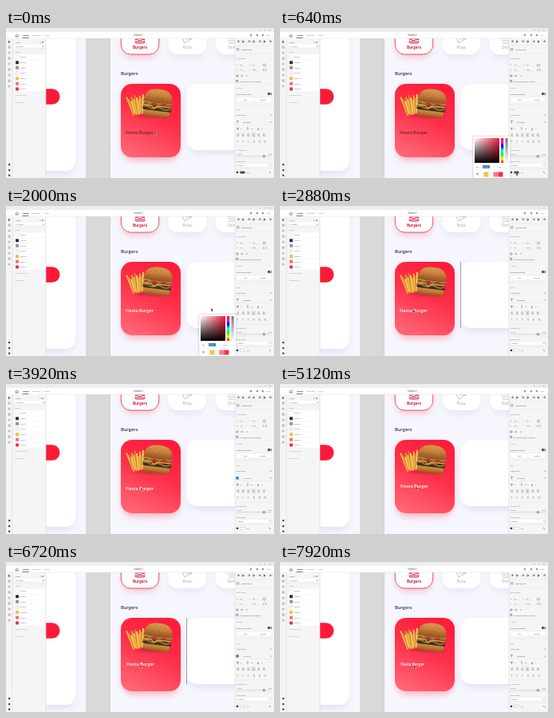
Recreate the animation shown at these times as an HTML page. Size 336 px wide and 188 px high, loop 8 s.

```html
<!DOCTYPE html>
<html lang="en">
<head>
<meta charset="utf-8">
<style>
html, body { margin: 0; width: 100%; height: 100%; overflow: hidden; background: #fff; }
svg { display: block; width: 100vw; height: 100vh; }
text { font-family: "Open Sans", "Noto Sans", sans-serif; white-space: pre; }
</style>
</head>
<body>
<svg id="stage" viewBox="0 0 336 188" xmlns="http://www.w3.org/2000/svg">
  <defs>
    <linearGradient id="red" x1=".7" y1="0" x2=".3" y2="1">
      <stop offset="0" stop-color="#fd1c3a"/><stop offset=".45" stop-color="#fe2f49"/><stop offset="1" stop-color="#ff6474"/>
    </linearGradient>
    <linearGradient id="bun" x1="0" y1="0" x2="0" y2="1">
      <stop offset="0" stop-color="#d99a52"/><stop offset=".5" stop-color="#c27a35"/><stop offset="1" stop-color="#95501f"/>
    </linearGradient>
    <linearGradient id="tint"><stop offset="0" stop-color="#fff"/><stop offset="1" stop-color="#f5203c"/></linearGradient>
    <linearGradient id="shade" x1="0" y1="0" x2="0" y2="1">
      <stop offset="0" stop-color="#000" stop-opacity="0"/><stop offset="1" stop-color="#000"/>
    </linearGradient>
    <linearGradient id="hue" x1="0" y1="0" x2="0" y2="1">
      <stop offset="0" stop-color="#f00"/><stop offset=".17" stop-color="#f0f"/><stop offset=".33" stop-color="#00f"/>
      <stop offset=".5" stop-color="#0ff"/><stop offset=".67" stop-color="#0f0"/><stop offset=".83" stop-color="#ff0"/>
      <stop offset="1" stop-color="#f00"/>
    </linearGradient>
    <linearGradient id="alpha" x1="0" y1="0" x2="0" y2="1">
      <stop offset="0" stop-color="#777"/><stop offset="1" stop-color="#fff"/>
    </linearGradient>
    <filter id="soft" x="-40%" y="-40%" width="180%" height="180%"><feGaussianBlur stdDeviation="4"/></filter>
    <filter id="tight" x="-40%" y="-40%" width="180%" height="180%"><feGaussianBlur stdDeviation="1.5"/></filter>
    <clipPath id="canvas"><rect x="50" y="13" width="237" height="175"/></clipPath>
  </defs>
</svg>
<script>
const NS = "http://www.w3.org/2000/svg";
const PANEL = "#f5f5f5", INK = "#3c3c3c", BLUE = "#2384bb";
const stage = document.getElementById("stage");

function add(parent, tag, attrs) {
  const el = document.createElementNS(NS, tag);
  for (const k in attrs) el.setAttribute(k, attrs[k]);
  parent.appendChild(el);
  return el;
}
const group = (parent, attrs = {}) => add(parent, "g", attrs);
const rect = (p, x, y, width, height, fill, more = {}) => add(p, "rect", { x, y, width, height, fill, ...more });
const path = (p, d, stroke, width = .5, more = {}) =>
  add(p, "path", { d, stroke, "stroke-width": width, fill: "none", ...more });
function label(p, x, y, str, size = 2.2, fill = "#666", more = {}) {
  const el = add(p, "text", { x, y, "font-size": size, fill, ...more });
  el.textContent = str;
  return el;
}
function card(p, x, y, w, h, r, fill, glow, opacity) {
  rect(p, x + 2, y + 4, w - 4, h, glow, { rx: r, opacity, filter: "url(#soft)" });
  rect(p, x, y, w, h, fill, { rx: r });
}
const bold = { "font-weight": 700 };
const semi = { "font-weight": 600 };
const mid = { "text-anchor": "middle" };

// Canvas
const canvas = group(stage, { "clip-path": "url(#canvas)" });
rect(canvas, 50, 13, 237, 175, "#d9d9d9");
rect(canvas, 50, 13, 50, 175, "#f6f6fe");
card(canvas, 20, -10, 67, 189, 12, "#fff", "#b9b9dc", .35);
rect(canvas, 30, 76.2, 37.5, 19.6, "#fc1a38", { rx: 9.8 });
rect(canvas, 131, 13, 156, 175, "#f6f6fe");
path(canvas, "M130.5 13V188", "#c4c4cb", .5);

card(canvas, 144, -10, 48, 43, 12, "#fff", "#f0425c", .28);
rect(canvas, 144.3, -10, 47.4, 43, "none", { rx: 12, stroke: "#d92a46", "stroke-width": .8 });
card(canvas, 203.5, -10, 47.5, 43, 12, "#fff", "#b9b9dc", .28);
card(canvas, 263, -10, 47.5, 43, 12, "#fff", "#b9b9dc", .28);

const burgerIcon = group(canvas, { transform: "translate(168 14)" });
path(burgerIcon, "M-6 -1Q-6 -5 0 -5T6 -1ZM-6.5 1Q-4.5 -.5 -2.5 1T1.5 1T6.5 1M-6 3H6Q6 5 4 5H-4Q-6 5 -6 3", "#d3203e", 1);
path(canvas, "M220 10Q228 7 235 12L224 19ZM222 12L233 14M225 14h2M229 13h1", "#999", .6);
path(canvas, "M276 10h11M277 13h10M278 16h9M279 19h8", "#999", .6);
label(canvas, 168, 26.2, "Burgers", 4.7, "#cf1f3d", { ...bold, ...mid });
label(canvas, 227, 26.2, "Pizza", 4.7, "#a0a0a6", mid);
label(canvas, 278, 26.2, "Drinks", 4.7, "#a0a0a6");
label(canvas, 144, 58.6, "Burgers", 5.7, "#30303a", semi);

card(canvas, 144, 70, 75, 92, 14, "url(#red)", "#ff5068", .4);
card(canvas, 226.5, 70, 80, 83, 13, "#fff", "#b9b9dc", .35);
const edge = path(canvas, "M226.5 70V153.5", "#777780", .7);

// Food picture, reduced to flat shapes
const food = group(canvas);
add(food, "ellipse", { cx: 184, cy: 110, rx: 23, ry: 2.5, fill: "#8c1024", opacity: .35, filter: "url(#tight)" });
for (let i = 0; i < 16; i++) {
  const x = 160 + i, top = 83 + (i * 7 % 5) * 1.6;
  rect(food, x, top, 1.9, 108 - top - (i % 3), ["#f3bd4a", "#cf8a26", "#fbd06c", "#e5a437"][i % 4],
    { rx: .4, transform: `rotate(${-22 + i * 2.4} ${x + 5} 110)` });
}
const burger = group(food, { transform: "rotate(7 190 95)" });
rect(burger, 173, 102, 33.5, 10, "url(#bun)", { rx: 4.5 });
rect(burger, 172, 98, 36, 6, "#4c2b1b", { rx: 2.5 });
path(burger, "M172 100.5Q176 98 180 100.5T188 100.5T196 100.5T207 100", "#78933c", 1.6);
path(burger, "M174 98.5L182 98L186 101L191 98H207", "#e2a436", 1.5);
path(burger, "M173 95.8H207", "#b5352a", 2.6);
path(burger, "M172 93.5Q174 91.5 177 94T183 94T189 94T195 94T201 94T208 93", "#80943e", 2.2);
add(burger, "path", { d: "M172.5 92.5Q171 77 190 76.5T207.5 92.5Q190 95 172.5 92.5Z", fill: "url(#bun)" });
for (let i = 0; i < 14; i++)
  add(burger, "ellipse", { cx: 179 + i * 1.7, cy: 80.5 + (i * 5 % 7) * .9, rx: .55, ry: .35, fill: "#f0cf96" });

const title = label(canvas, 150, 132.8, "Fiesta Burger", 5.5, "#fff", semi);

// Window bar
rect(stage, 0, 0, 336, 13, "#fff");
rect(stage, 0, 0, 336, 5, "#eee");
path(stage, "M0 13H336", "#dcdcdc", .5);
path(stage, "M12.2 9.2L13.7 7.8L15.2 9.2V11H12.2Z", INK, .6);
label(stage, 21, 10, "Design", 2.4, "#222", bold);
path(stage, "M20.5 12.3H28.5", "#333", .7);
label(stage, 33, 10, "Prototype", 2.3);
label(stage, 48, 10, "Share", 2.3);
label(stage, 166, 10, "Untitled-1", 2.6, INK, mid);
for (const x of [307, 315, 322])
  add(stage, "circle", { cx: x, cy: 9, r: .9, fill: "none", stroke: INK, "stroke-width": .6 });
label(stage, 326, 10, "100%", 2.4);
path(stage, "M318 2.5h2M324 2.5h2M330 1.5l2 2m0-2l-2 2", "#777", .4);

// Tools and assets
rect(stage, 0, 13, 50, 175, PANEL);
path(stage, "M8 13V188M50 13V188", "#d8d8d8", .6);
add(stage, "path", { d: "M3 15.3l2.8 2.8l-1.5 .1l-1.3 1.1Z", fill: "#2d62c7" });
[24, 31, 38, 45, 52, 59, 66, 73].forEach((y, i) =>
  rect(stage, 3, y - 1, 2.1, 2.1, "none", { rx: i % 2, stroke: "#666", "stroke-width": .45 }));
for (const y of [171, 178, 184.5]) rect(stage, 3, y - 1, 2.2, 2.2, "#444", { rx: .5 });
label(stage, 11.5, 18.8, "Assets", 2.3, INK);
path(stage, "M42 18h1.5M46 17v2m-1-1h2", INK, .5);
rect(stage, 11, 20.8, 37.5, 4, "#fff");
path(stage, "M11 25H48.5M8 27H50", "#dedede", .4);
label(stage, 12, 23.6, "All Assets", 2.2, INK);
path(stage, "M46 22.5l1 1l1 -1", INK, .6);
label(stage, 11.5, 31, "Colors", 2.1);
const swatches = ["#FFFFFF", "#262626", "#929292", "#F2F2F5", "#FBC02D", "#F06D7C", "#F92440"];
swatches.forEach((c, i) => {
  const y = 34.5 + i * 6.65;
  rect(stage, 11, y - 1, 38, 6, "#fff");
  rect(stage, 12, y, 4, 4, c, { stroke: "#ccc", "stroke-width": .3 });
  label(stage, 17.5, y + 2.8, c, 2, "#555");
});
label(stage, 11.5, 85, "Character Styles", 2, "#888");
label(stage, 11.5, 93.5, "Components", 2, "#888");

// Inspector
rect(stage, 287, 13, 49, 175, PANEL);
path(stage, "M287 13V188", "#d8d8d8", .6);
const rule = y => path(stage, `M287 ${y}H336`, "#e0e0e0", .4);
[22, 32, 70, 96, 148, 163].forEach(rule);
for (let i = 0; i < 7; i++) {
  const x = 290 + i * 6.7;
  path(stage, i % 2 ? `M${x} 15.5v3m1.2 -2.5v2` : `M${x} 17h3m-2 -1.2h1`, INK, .8);
}
path(stage, "M289.5 25.5h2.5v2.5h-2.5Z", "#666", .5);
label(stage, 295, 27.9, "Repeat Grid", 2.4, INK);
label(stage, 289, 39, "TRANSFORM", 2);
[["W", "X", 46.6], ["H", "Y", 53.2]].forEach(([a, b, y], i) => {
  label(stage, 289, y, a, 2.2);
  label(stage, 293.5, y, i ? "18" : "96", 2.3, INK);
  label(stage, 305, y, b, 2.2);
  label(stage, 309, y, i ? "345" : "40", 2.3, INK);
  path(stage, `M293 ${y + 1}h8M309 ${y + 1}h8`, "#ccc", .3);
});
path(stage, "M324 45a1.5 1.5 0 1 1 -.1 0M323 51v3m3 -3v3", "#555", .5);
path(stage, "M289 59h2v2h-2ZM295 59v2m1.5 -2v2M301 60h2", "#555", .5);
rect(stage, 288.8, 65.6, 2, 2, "#fff", { stroke: "#444", "stroke-width": .5 });
label(stage, 292.5, 67.5, "Fix position when scrolling", 2.2, INK);
label(stage, 289, 76, "LAYOUT", 2);
label(stage, 289, 83.6, "Responsive Resize", 2.2, INK);
rect(stage, 328, 81, 5, 3, "#333", { rx: 1.5 });
add(stage, "circle", { cx: 331.3, cy: 82.5, r: .9, fill: "#fff" });
rect(stage, 289, 86.7, 44, 6.2, "#fff", { rx: 1, stroke: "#ddd", "stroke-width": .4 });
path(stage, "M311 87V93", "#ddd", .4);
label(stage, 300, 90.7, "Auto", 2.2, INK, mid);
label(stage, 322, 90.7, "Manual", 2.2, INK, mid);
label(stage, 289, 102.5, "TEXT", 2);
label(stage, 289, 109.8, "Open Sans", 2.3, INK);
path(stage, "M289 112H333M289 121.5H333", "#d8d8d8", .3);
path(stage, "M331 108.5l1 1l1 -1M331 117.5l1 1l1 -1", INK, .5);
const sizeIcon = path(stage, "M289 116.5h3m-1.5 0v3", "#555", .5);
const sizeMark = rect(stage, 288.4, 116.2, 3.4, 3.4, BLUE);
const sizeText = label(stage, 297, 118.9, "SemiBold", 2.3, INK);
path(stage, "M289 125.5h3m-1.5 0v2.5M302 125h2m-2 2h2M316 125v2.5m-1 0h2", INK, .5);
["0", "26", "0"].forEach((s, i) => label(stage, 294 + i * 13, 127.2, s, 2.3, INK));
for (let i = 0; i < 6; i++)
  path(stage, `M${289.5 + i * 6.5} 133h3m-3 1.2h2m-2 1.2h3`, "#555", .4);
rect(stage, 308, 131.8, 4.6, 4.6, "none", { stroke: "#bbb", "stroke-width": .3, rx: .6 });
for (let i = 0; i < 6; i++) label(stage, 289.5 + i * 6.8, 143.8, i < 3 ? "T" : "Tt", 2.6, "#555");
label(stage, 289, 153.7, "APPEARANCE", 2);
label(stage, 289, 158.8, "Opacity", 2.1);
path(stage, "M289 160.7H333", "#bbb", .5);
add(stage, "circle", { cx: 323.4, cy: 160.7, r: 1.2, fill: "#fff", stroke: INK, "stroke-width": .7 });
label(stage, 328, 158.8, "100%", 2.1, INK);
label(stage, 289, 167.6, "Blend Mode", 2.1);
rect(stage, 288.8, 169.2, 44.2, 5, "#fff", { stroke: "#ddd", "stroke-width": .4 });
label(stage, 290, 172.6, "Normal", 2.2, INK);
path(stage, "M330 171.3l1 1l1 -1", INK, .5);
rule(176.5);
rect(stage, 288.8, 179.7, 2.4, 2.4, "#333", { rx: .4 });
const fillChip = rect(stage, 293.5, 179.5, 6, 3, "#fff", { stroke: "#bbb", "stroke-width": .4 });
label(stage, 302, 182, "Fill", 2.2, INK);
path(stage, "M330 180l2 2", INK, .6);

// Colour picker
const picker = group(stage);
rect(picker, 242, 136, 46, 54, "#555", { opacity: .3, filter: "url(#tight)" });
rect(picker, 242, 135.5, 46.5, 54, "#fff", { rx: 1, stroke: "#ccc", "stroke-width": .4 });
rect(picker, 244, 138, 31, 31, "url(#tint)");
rect(picker, 244, 138, 31, 31, "url(#shade)");
rect(picker, 277, 138, 3.3, 31, "url(#hue)", { rx: 1 });
rect(picker, 282.5, 138, 3.3, 31, "url(#alpha)", { rx: 1, stroke: "#ccc", "stroke-width": .3 });
label(picker, 245, 175, "Hex", 2.3, INK);
rect(picker, 254, 172, 9, 4, "#3c86c4");
label(picker, 254.4, 175, "FFFFFF", 2.2, "#fff");
label(picker, 272, 175, "100%", 2.2, INK);
path(picker, "M244 178H286", "#e2e2e2", .4);
path(picker, "M246 183h3m-1.5 -1.5v3", "#555", .5);
[["#f9c436", 255.5], ["#f4f4f6", 261.8], ["#f07c89", 267.5], ["#fb2c45", 273.5]].forEach(([c, x]) =>
  rect(picker, x, 180.5, 6, 6, c));

const cursor = add(stage, "path", {
  d: "M0 0V4.2L1.1 3.3L1.8 4.8L2.5 4.5L1.8 3H3Z", fill: "#222", stroke: "#fff", "stroke-width": .35
});

// Timeline: [time, ...values], eased between stops
const pointer = [
  [0, 186, 130], [80, 186, 130], [480, 296, 181], [640, 296, 181], [960, 243, 136], [1840, 243, 136],
  [2080, 262, 125], [2640, 167, 129.5], [3200, 167, 129.5], [3680, 169, 130], [4400, 169, 130],
  [4720, 170, 128.5], [7120, 168, 128.5], [7680, 168, 129], [8000, 168, 129]
];
const layout = [
  [0, 150, 132.8, 5.5], [4400, 150, 132.8, 5.5], [4720, 151, 130, 5.5],
  [7120, 151, 130, 5.5], [7600, 151.2, 130, 4.7], [8000, 151.2, 130, 4.7]
];
function at(stops, t) {
  const i = Math.max(1, stops.findIndex(s => s[0] > t));
  const a = stops[i - 1], b = stops[i];
  const k = (t - a[0]) / (b[0] - a[0]), e = k * k * (3 - 2 * k);
  return a.slice(1).map((v, n) => v + (b[n + 1] - v) * e);
}
const within = (t, a, b) => t >= a && t < b;
const show = (el, on) => el.setAttribute("visibility", on ? "visible" : "hidden");

function draw(ms) {
  const t = Math.floor((ms % 8000) / 80) * 80;
  const [cx, cy] = at(pointer, t);
  cursor.setAttribute("transform", `translate(${cx} ${cy})`);
  const [x, y, size] = at(layout, t);
  title.setAttribute("x", x);
  title.setAttribute("y", y);
  title.setAttribute("font-size", size);
  const dark = t < 960;
  title.setAttribute("fill", dark ? "#70202e" : "#fff");
  fillChip.setAttribute("fill", dark ? "#444" : "#fff");
  show(picker, within(t, 560, 2080));
  show(edge, within(t, 2560, 3200) || within(t, 6080, 6960));
  const marked = within(t, 3680, 4480) || within(t, 5840, 6960);
  show(sizeMark, marked);
  show(sizeIcon, !marked);
  sizeText.setAttribute("fill", marked ? BLUE : INK);
}
function tick(now) {
  draw(now);
  requestAnimationFrame(tick);
}
draw(0);
requestAnimationFrame(tick);
</script>
</body>
</html>
```
